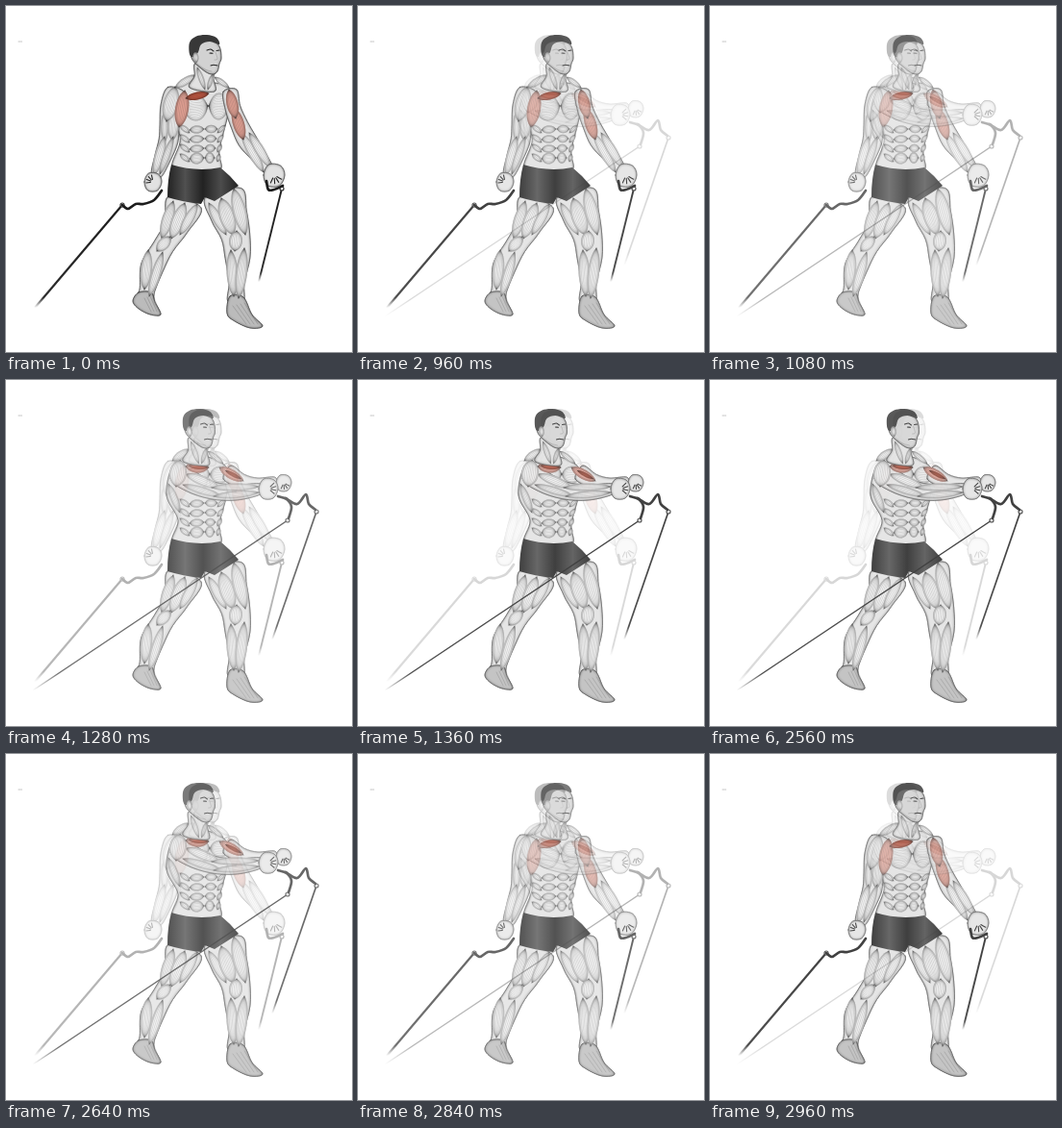
Write an HTML page that moves like this. It is 360 by 360 pixels and loops after 3 s.

```html
<!DOCTYPE html>
<html lang="en">
<head>
<meta charset="utf-8">
<title>Cable fly</title>
<style>
html, body { margin: 0; height: 100%; overflow: hidden; background: #fff; }
svg { display: block; width: 100vw; height: 100vh; }
path { stroke-linecap: round; stroke-linejoin: round; }
.skin { fill: #e2e2e2; stroke: #666; stroke-width: .7; filter: url(#volume); }
.muscle { fill: #f6f6f6; filter: url(#volume); }
.red { fill: #e8a496; filter: url(#volume); }
.deep { fill: #c4563f; filter: url(#volume); }
.face { fill: #d2d2d2; stroke: #555; stroke-width: .7; filter: url(#volume); }
.foot { fill: #bbb; stroke: #555; stroke-width: .7; filter: url(#volume); }
.hair { fill: #383838; }
.shorts { fill: url(#cloth); }
.fibre { fill: none; stroke: #333; stroke-width: .45; opacity: .45; }
.mark { fill: none; stroke: #222; stroke-width: 1.1; }
.grip { fill: none; stroke: #1c1c1c; stroke-width: 2.7; }
.ring { fill: #fff; stroke: #333; stroke-width: 1.2; }
.cable { stroke: url(#fade); }
</style>
</head>
<body>
<svg viewBox="0 0 360 360">
  <defs>
    <filter id="volume" color-interpolation-filters="sRGB">
      <feGaussianBlur in="SourceAlpha" stdDeviation="1.7"/>
      <feComponentTransfer><feFuncA type="linear" slope="-.75" intercept=".75"/></feComponentTransfer>
      <feComposite in2="SourceAlpha" operator="in" result="shade"/>
      <feMerge><feMergeNode in="SourceGraphic"/><feMergeNode in="shade"/></feMerge>
    </filter>
    <linearGradient id="fade" x2="0" y2="1">
      <stop stop-color="#1c1c1c"/><stop offset=".9" stop-color="#2c2c2c"/>
      <stop offset="1" stop-color="#222" stop-opacity="0"/>
    </linearGradient>
    <linearGradient id="cloth">
      <stop stop-color="#222"/><stop offset=".25" stop-color="#505050"/><stop offset=".5" stop-color="#222"/>
      <stop offset=".75" stop-color="#4c4c4c"/><stop offset="1" stop-color="#222"/>
    </linearGradient>
    <g id="head"></g>
    <g id="legs"></g>
  </defs>
  <g id="open"></g>
  <g id="closed"></g>
  <path d="M13 37h1.5m1 0h1" stroke="#999" stroke-width=".6"/>
</svg>
<script>
const $ = id => document.getElementById(id);
let layer;

function add(tag, attrs) {
  const el = document.createElementNS('http://www.w3.org/2000/svg', tag);
  for (const key in attrs) el.setAttribute(key, attrs[key]);
  layer.append(el);
}

const group = (flat, size) =>
  Array.from({ length: flat.length / size }, (_, i) => flat.slice(i * size, (i + 1) * size));

// Smooth curve through the points
function curve(pts, loop) {
  const len = pts.length;
  const at = i => pts[loop ? (i + len) % len : Math.max(0, Math.min(len - 1, i))];
  let d = 'M' + pts[0];
  for (let i = 0; i < (loop ? len : len - 1); i++) {
    const [a, b, c, e] = [at(i - 1), at(i), at(i + 1), at(i + 2)];
    d += 'C' + [b.map((v, k) => v + (c[k] - a[k]) / 6), c.map((v, k) => v - (e[k] - b[k]) / 6), c];
  }
  return d + (loop ? 'Z' : '');
}

const shape = (kind, ...flat) => add('path', { class: kind, d: curve(group(flat, 2), true) });
const line = (kind, ...flat) => add('path', { class: kind, d: curve(group(flat, 2)) });

// Tapered tube through stations of x, y, radius
function limb(...flat) {
  const st = group(flat, 3);
  const side = s => st.map(([x, y, r], i) => {
    const a = st[Math.max(0, i - 1)], b = st[Math.min(st.length - 1, i + 1)];
    const dx = b[0] - a[0], dy = b[1] - a[1], k = s * r / Math.hypot(dx, dy);
    return [x - dy * k, y + dx * k];
  });
  add('path', { class: 'skin', d: curve([...side(1), ...side(-1).reverse()], true) });
}

// Rounded belly of half-width w between two ends, with fibres along it
function muscle(x1, y1, x2, y2, w, kind = 'muscle') {
  const dx = x2 - x1, dy = y2 - y1, len = Math.hypot(dx, dy);
  const ctrl = (u, v) => [x1 + dx * u - dy / len * v, y1 + dy * u + dx / len * v];
  const arc = v => 'C' + [ctrl(.15, v), ctrl(.85, v), [x2, y2]];
  const back = 'C' + [ctrl(.85, -w * 1.33), ctrl(.15, -w * 1.33), [x1, y1]];
  add('path', { class: kind, d: `M${x1} ${y1}${arc(w * 1.33)}${back}Z` });
  const n = Math.floor(w / 2);
  for (let i = -n; i <= n; i++)
    add('path', { class: 'fibre', d: `M${x1} ${y1}${arc(w * 1.2 * i / (n + .5))}` });
}

function fist(x, y, r, tilt) {
  shape('skin', x - r, y, x - r * .5, y - r, x + r * .6, y - r * .9, x + r, y, x + r * .5, y + r, x - r * .6, y + r);
  for (let i = 0; i < 4; i++) {
    const a = tilt + i * .5, c = Math.cos(a), s = Math.sin(a);
    line('mark', x + r * .3 * c, y + r * .3 * s, x + r * .8 * c, y + r * .8 * s);
  }
}

function cable(x1, y1, x2, y2, width) {
  add('line', { class: 'cable', x1, y1, x2, y2, 'stroke-width': width });
  add('circle', { class: 'ring', cx: x1, cy: y1, r: 2 });
}

function belly() {
  for (let i = 0; i < 4; i++) {
    const y = 128 + i * 10, h = i < 3 ? 4.2 : 6;
    muscle(191, y + 1, 206, y, h);
    muscle(207, y, 220 - i, y, h);
    muscle(181, y - 4, 191, y + 4, 3);
    muscle(228 - i * 2, y - 4, 220, y + 4, 2.5);
  }
}

layer = $('head');
limb(207, 60, 10, 206, 74, 10, 204, 87, 13);
muscle(199, 64, 207, 87, 3);
muscle(215, 71, 210, 87, 2.5);
shape('face', 192, 42, 194, 56, 207, 68, 215, 71, 220, 68, 222, 60, 224, 54, 222, 42, 213, 34, 199, 35);
shape('hair', 191, 50, 191, 38, 198, 31.5, 209, 30, 219, 33, 222, 40, 212, 37, 203, 40, 200, 48, 195, 53);
muscle(197, 48, 198, 59, 3);
line('mark', 209, 46, 213, 45, 216, 47);
line('mark', 219, 46.5, 222, 46);
line('mark', 212, 49, 215, 49.3);
line('fibre', 218, 48, 220, 55, 217, 56);
line('mark', 213, 62, 216, 61.3, 220, 62);
line('fibre', 199, 61, 207, 66, 214, 68);

layer = $('legs');
limb(186, 204, 18, 177, 230, 13, 164, 250, 11, 152, 272, 12, 147, 295, 8, 144, 308, 8);
shape('foot', 138, 298, 132, 307, 138, 315, 150, 321, 161, 321, 155, 308, 151, 298);
muscle(174, 203, 162, 242, 6);
muscle(186, 205, 172, 242, 7);
muscle(199, 206, 181, 238, 5);
muscle(171, 240, 157, 255, 6);
muscle(148, 254, 144, 295, 6);
muscle(163, 256, 149, 302, 5);
limb(226, 194, 19, 232, 218, 19, 239, 240, 15, 241, 262, 13, 240, 288, 8, 239, 308, 8);
shape('foot', 233, 302, 230, 320, 238, 328, 254, 335, 267, 333, 256, 321, 247, 303);
muscle(211, 205, 229, 238, 5);
muscle(224, 200, 236, 238, 8);
muscle(237, 190, 249, 238, 7);
muscle(240, 234, 238, 255, 7);
muscle(234, 254, 237, 302, 6);
muscle(248, 252, 242, 304, 6);
for (let i = 0; i < 4; i++) {
  line('fibre', 144 + i * 3, 304 - i, 151 + i * 3, 318);
  line('fibre', 236 + i * 4, 312 - i, 250 + i * 4, 331);
}
add('path', { class: 'shorts', d: 'M172 165Q198 173 223 168Q233 176 242 187L217 203L207 199L203 206Q184 204 168 199Q168 180 172 165Z' });

// Arms lowered
layer = $('open');
shape('skin', 195, 80, 177, 85, 179, 125, 181, 142, 173, 169, 198, 173, 223, 170, 222, 150, 231, 112, 232, 85, 217, 80);
belly();
muscle(184, 107, 210, 104, 14);
muscle(211, 104, 232, 105, 14);
add('use', { href: '#legs' });
limb(177, 87, 9, 172, 104, 11, 170, 124, 10, 169, 140, 10, 163, 158, 8.5, 156, 177, 5);
muscle(165, 110, 165, 142, 4);
muscle(175, 108, 173, 140, 6);
muscle(165, 136, 154, 176, 5);
muscle(174, 136, 160, 175, 4);
muscle(176, 84, 167, 120, 8);
muscle(186, 88, 180, 126, 7, 'red');
muscle(187, 96, 211, 91, 4, 'deep');
limb(233, 88, 7, 236, 106, 8, 243, 124, 9, 251, 140, 10, 262, 155, 8, 273, 170, 5);
muscle(245, 132, 268, 173, 5);
muscle(253, 132, 275, 168, 5);
muscle(237, 106, 247, 139, 6, 'red');
muscle(232, 87, 239, 117, 6, 'red');
muscle(197, 72, 176, 85, 4);
muscle(217, 74, 232, 85, 3);
add('use', { href: '#head' });
cable(121, 207, 30, 314, 2.2);
cable(287, 190, 263, 287, 1.9);
fist(153, 183, 9, 3);
line('grip', 162, 192, 154, 202, 143, 206, 135, 206, 127, 211, 121, 207);
fist(279, 176, 11, .5);
line('grip', 271, 182, 273, 191, 279, 191, 288, 187);

// Arms pressed forward
layer = $('closed');
shape('skin', 188, 80, 173, 90, 167, 120, 179, 146, 173, 169, 198, 173, 223, 170, 222, 150, 230, 118, 230, 92, 210, 80);
belly();
muscle(169, 108, 181, 138, 4);
muscle(191, 98, 212, 98, 10);
muscle(212, 98, 233, 99, 9);
add('use', { href: '#legs' });
limb(230, 96, 8, 246, 105, 7, 262, 107, 5, 280, 105, 4);
muscle(222, 91, 247, 105, 5, 'red');
muscle(228, 94, 245, 103, 2, 'deep');
limb(178, 94, 11, 193, 106, 11, 215, 115, 9, 240, 117, 8, 266, 113, 5);
muscle(187, 98, 222, 112, 5);
muscle(184, 109, 224, 121, 4);
muscle(214, 112, 263, 111, 4);
muscle(216, 121, 263, 117, 4);
muscle(181, 83, 177, 111, 9);
muscle(187, 90, 211, 91, 6, 'red');
muscle(190, 89, 210, 91, 3, 'deep');
muscle(190, 72, 173, 84, 4);
muscle(210, 74, 226, 87, 3);
add('use', { href: '#head', x: -6.5 });
fist(289, 107, 8, .5);
fist(273, 113, 10, 5.5);
cable(293, 146, 28, 323, 1.5);
cable(323, 137, 277, 270, 1.7);
line('grip', 283, 121, 292, 124, 297, 132, 294, 144);
line('grip', 291, 123, 303, 129, 312, 119, 315, 129, 322, 135);

// Cross-fade in sixths, one step per 100 ms on a 40 ms clock
const steps = (t, start) => Math.max(0, Math.min(6, Math.floor((t - start) / 100) + 1));
function frame(now) {
  const t = Math.floor(now % 3000 / 40) * 40;
  const p = (steps(t, 960) - steps(t, 2540)) / 6;
  $('open').setAttribute('opacity', 1 - p);
  $('closed').setAttribute('opacity', p);
  requestAnimationFrame(frame);
}
frame(performance.now());
</script>
</body>
</html>
```
